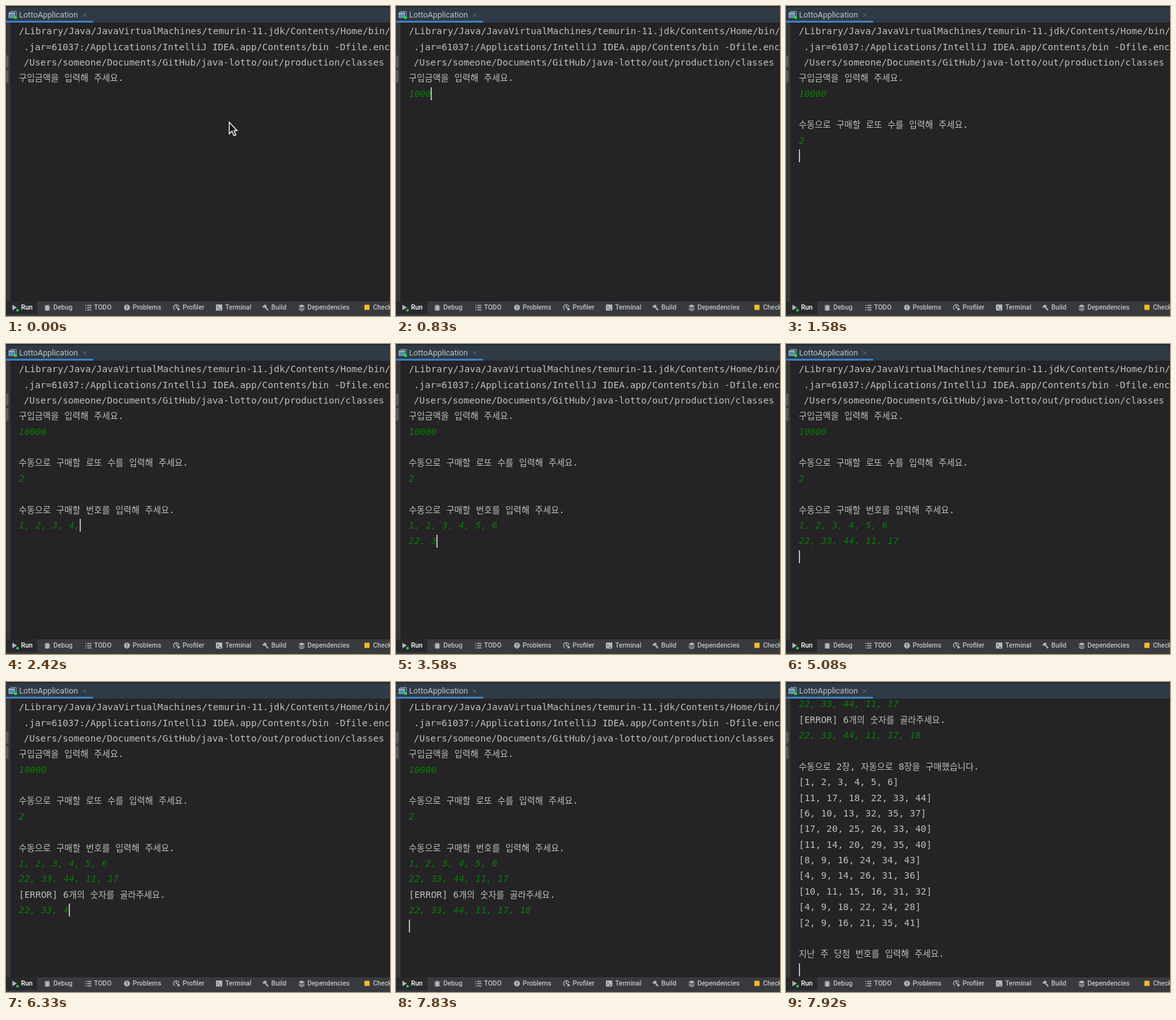
An HTML page for the animation above (8000 ms loop, 600 by 484 pixels).

```html
<!DOCTYPE html>
<html lang="ko">
<head>
<meta charset="utf-8">
<title>Console</title>
<style>
  html, body { margin: 0; width: 100%; height: 100%; overflow: hidden; background: #252325; }
  #stage { position: relative; width: 600px; height: 484px; overflow: hidden; }
  #stage > svg { position: absolute; left: 0; top: 0; }
  svg text { font: 500 10.4px Roboto, sans-serif; fill: #c0c2c4; }
  #view { position: absolute; left: 7px; top: 26px; width: 593px; height: 435px; overflow: hidden; }
  #log {
    position: absolute; left: 13px; top: 1.2px; margin: 0; white-space: pre; tab-size: 7.8px;
    font: 14.4px/24.37px "DejaVu Sans Mono", monospace; color: #c0c0c0;
  }
  #log b { font: 500 13.6px/0 "Noto Sans CJK KR", "Noto Sans CJK", sans-serif; }
  #log i { color: #087d08; }
  #caret { position: absolute; width: 2px; height: 20px; margin: 2.2px 0 0 -.5px; background: #b4b4b4; }
</style>
</head>
<body>
<div id="stage">
  <div id="view"><pre id="log"></pre></div>
  <svg width="600" height="484">
    <rect width="600" height="26" fill="#2f3a47"/>
    <rect width="600" height="2" fill="#25282c"/>
    <rect y="23" width="136" height="3" fill="#3c80c0"/>
    <g fill="none" stroke="#9fb0bb">
      <path d="M6.5 8.5h9.5v7"/>
      <rect x="4.5" y="10.5" width="9" height="7.5" fill="#4893b5"/>
      <path d="M4.5 11.5h9" stroke-width="2"/>
    </g>
    <circle cx="15" cy="18" r="2.4" fill="#27d845"/>
    <text x="20.5" y="18" style="font-size:12.5px;font-weight:400">LottoApplication</text>
    <path d="M120 11.5l5.5 5.5m0-5.5l-5.5 5.5" stroke="#66717b"/>

    <rect y="26" width="7" height="435" fill="#353638"/>
    <rect x="-3" y="77" width="7" height="19" rx="2" fill="#57595b"/>
    <rect x="-3" y="100" width="7" height="20" rx="2" fill="#57595b"/>

    <rect y="461" width="600" height="23" fill="#383a3d"/>
    <rect y="461" width="49" height="20" fill="#27292b"/>
    <g id="tabs"></g>
    <g fill="#b4b7b9" stroke="#b4b7b9" stroke-width="1.3">
      <path d="M10 466.500v8.500l7-4.250z" stroke="none"/>
      <circle cx="18" cy="475" r="2.1" fill="#27d845" stroke="none"/>
      <ellipse cx="64.500" cy="471.500" rx="2.600" ry="3.600"/>
      <path d="M60 468.500h9m-9 3h9m-9 3h9M62.500 466l1 2m3-2l-1 2" stroke-width="1"/>
      <path d="M124 467.500h1.500m1.500 0h6.500M124 471h1.500m1.500 0h6.500M124 474.500h1.500m1.500 0h6.500" stroke-width="1.500"/>
      <circle cx="189" cy="470.800" r="4.600" stroke="none"/>
      <path d="M189 468v3.500m0 1.200v1.300" stroke="#393b3e"/>
      <path d="M264 474.500a4.300 4.300 0 1 1 6.200-4.500M266 467.500v3.500h2" fill="none"/>
      <path d="M268 470.500v5.500l4.500-2.750z" stroke="none"/>
      <rect x="328" y="466" width="10" height="9.500" rx="1" stroke="none"/>
      <path d="M330 468.500l2 2-2 2m3 1h3" fill="none" stroke="#393b3e" stroke-width="1"/>
      <path d="M400.500 469.500l4-3.500 3 2-1.500 2.500-1.500-1-2 2z" stroke="none"/>
      <path d="M404.500 469.500l5 5.500" stroke-width="2"/>
      <path d="M457 468.500l5-2.500 5 2.500-5 2.500z" stroke="none"/>
      <path d="M457.500 471l4.500 2.300 4.500-2.300m-9 2.500l4.500 2.300 4.500-2.300" fill="none"/>
    </g>
    <rect x="560" y="466.500" width="8" height="8" fill="#f2bd2c"/>

    <path id="mouse" d="M348.800 181.500v18l4.200-3.900 3.200 6.900 3-1.400-3.100-6.700h5z" fill="#111" stroke="#f0f0f0" stroke-width="1.500"/>
  </svg>
</div>
<script>
const TICKS_PER_SECOND = 12, LOOP = 8000;
const SCROLL_TICK = 95, SCROLL_BY = 272.6;
const $ = id => document.getElementById(id);

const tabs = { Run: 23.5, Debug: 74, TODO: 137.5, Problems: 198, Profiler: 276, Terminal: 342.5,
  Build: 414.5, Dependencies: 471, Checkstyle: 573.5 };
$('tabs').innerHTML = Object.entries(tabs).map(([name, x]) =>
  `<text x="${x}" y="474"${name === 'Run' ? ' style="fill:#fff"' : ''}>${name}</text>`).join('');

const events = [];
const print = (tick, text) =>
  events.push({ tick, html: text.replace(/[가-힣]+/g, '<b>$&</b>') });
// One chunk per tick; an empty chunk is a pause.
const type = (tick, keys) => keys.split('|').forEach((key, i) =>
  events.push({ tick: tick + i, html: `<i>${key}</i>` }));

// Tabs stand for the narrow indent of soft-wrapped lines.
print(0, `/Library/Java/JavaVirtualMachines/temurin-11.jdk/Contents/Home/bin/java
\t.jar=61037:/Applications/IntelliJ IDEA.app/Contents/bin -Dfile.encoding=UTF-8
\t/Users/someone/Documents/GitHub/java-lotto/out/production/classes
구입금액을 입력해 주세요.
`);
type(3, '1||0||0||0||0||||\n');
print(16, '\n수동으로 구매할 로또 수를 입력해 주세요.\n');
type(18, '2|\n');
print(20, '\n수동으로 구매할 번호를 입력해 주세요.\n');
type(21, '1|,| |2|,| 3|,| 4|,| 5|,| 6|\n');
type(37, '2|2||,| ||3|3|,| |4|4|, |1|1|,| ||1|||7|||\n');
print(62, '[ERROR] 6개의 숫자를 골라주세요.\n');
type(70, '2|2|,| |3|3,| 4|4|,| ||1|1|,| |1|7||,| ||1|8||\n');
print(95, `
수동으로 2장, 자동으로 8장을 구매했습니다.
[1, 2, 3, 4, 5, 6]
[11, 17, 18, 22, 33, 44]
[6, 10, 13, 32, 35, 37]
[17, 20, 25, 26, 33, 40]
[11, 14, 20, 29, 35, 40]
[8, 9, 16, 24, 34, 43]
[4, 9, 14, 26, 31, 36]
[10, 11, 15, 16, 31, 32]
[4, 9, 18, 22, 24, 28]
[2, 9, 16, 21, 35, 41]

지난 주 당첨 번호를 입력해 주세요.
`);

let shown = -1;
function render(tick) {
  const caretOn = tick >= 3 && (tick < 65 || tick >= 67);
  $('log').innerHTML = events.filter(e => e.tick <= tick).map(e => e.html).join('')
    + '\u200b' + (caretOn ? '<span id="caret"></span>' : '');
  $('log').style.transform = tick >= SCROLL_TICK ? `translateY(${-SCROLL_BY}px)` : 'none';
  $('mouse').style.display = tick < 3 ? '' : 'none';
}

const start = performance.now();
function frame(now) {
  const time = Math.max(0, now - start) % LOOP;
  const tick = Math.min(95, Math.floor((time + 5) * TICKS_PER_SECOND / 1000));
  if (tick !== shown) render(shown = tick);
  requestAnimationFrame(frame);
}
frame(start);
</script>
</body>
</html>
```
